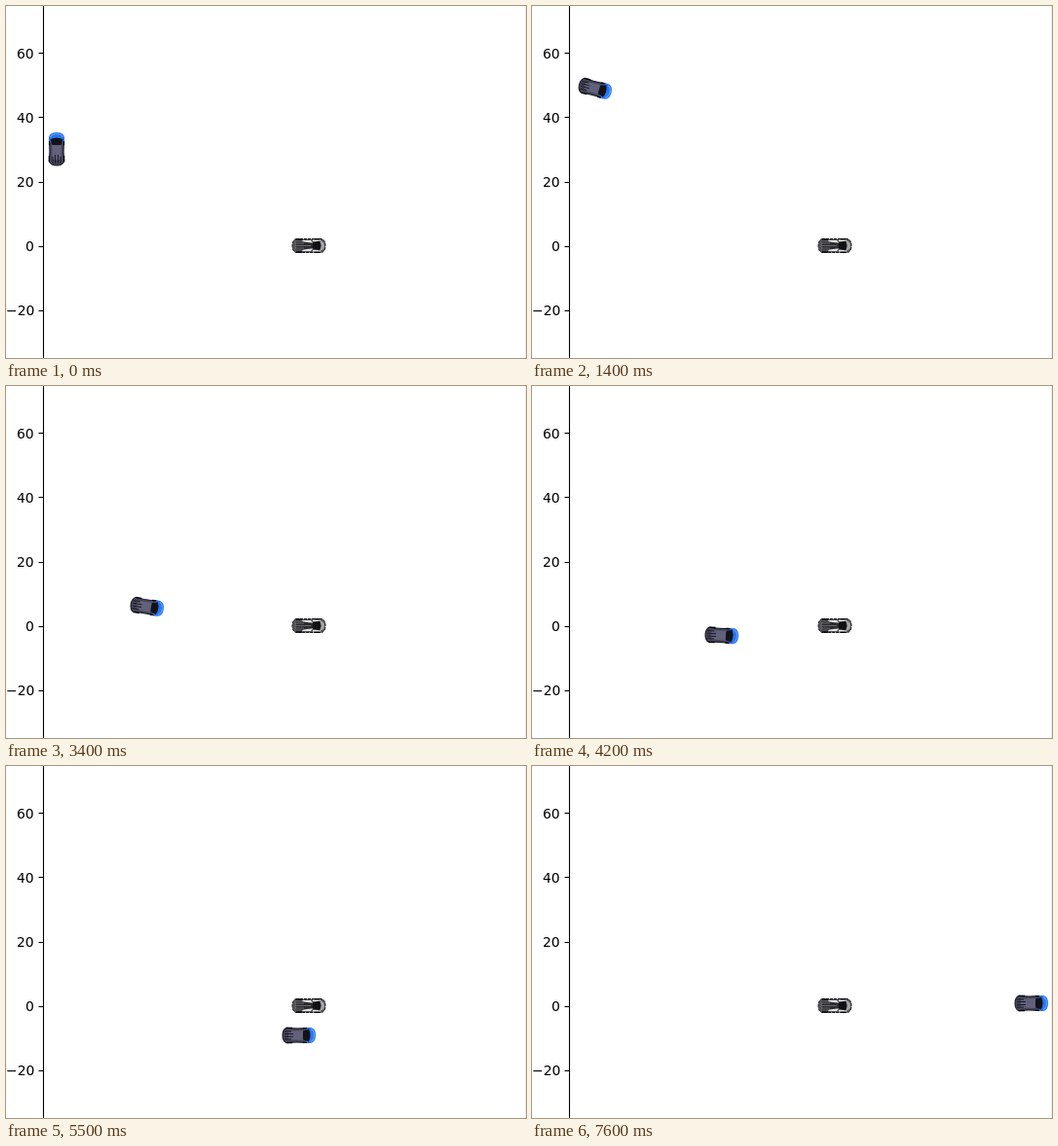
An HTML page that plays this animation: 534 by 362 pixels, repeating every 7.7 s.

```html
<!DOCTYPE html>
<html lang="en">
<head>
<meta charset="utf-8">
<title>Car trajectory</title>
<style>
  html, body { margin: 0; width: 100%; height: 100%; overflow: hidden; background: #fff; }
  svg { display: block; width: 534px; height: 362px; }
  text { font: 13.9px "DejaVu Sans", sans-serif; }
</style>
</head>
<body>
<svg viewBox="0 0 534 362">
  <rect width="534" height="362" fill="#fff"/>
  <path d="M533.5 0V362" stroke="#eee"/>
  <path d="M38.5 0V362" stroke="#000" stroke-width="1.1"/>
  <g id="ticks" stroke-width="1.1"></g>

  <g transform="translate(311 246.5)">
    <path d="M-13-7H13Q17-6 17 0T13 7H-13Q-17 6-17 0T-13-7Z" fill="#55555a" stroke="#161618" stroke-dasharray="3 1"/>
    <path d="M-7-5.5H2L4-3H-5ZM-7 5.5H2L4 3H-5ZM4-6H12V-4.5H4ZM4 6H12V4.5H4Z" fill="#e4e4e4"/>
    <path d="M11-5.5Q16-4.5 16 0T11 5.5L13 0Z" fill="#a5a5a8"/>
    <path d="M-13-4H-5L4-2.5V2.5L-5 4H-13Z" fill="#2b2b30"/>
    <path d="M4-3L11-5Q13 0 11 5L4 3Z" fill="#111114"/>
    <path d="M-14-2.5H-5M-14 0H2M-14 2.5H-5" stroke="#77777c" stroke-width=".8"/>
    <path d="M-13-6.5H-7M-13 6.5H-7M6-6.8H11M6 6.8H11" stroke="#000" stroke-width="1.3"/>
  </g>

  <g id="car">
    <path d="M-13-8.5H12Q17.5-7 17.5 0T12 8.5H-13Q-17.5 7-17.5 0T-13-8.5Z" fill="#e8e8f6"/>
    <path d="M-13-7.7Q-4-6.5 9-7.5V7.5Q-4 6.5-13 7.7Q-17 6-17 0T-13-7.7Z" fill="#454558" stroke="#14141c"/>
    <path d="M6-8H12Q17-7 17 0T12 8H6L10 0Z" fill="#2876f0"/>
    <path d="M12-6.5Q15.5-5 15.5 0T12 6.5" fill="none" stroke="#5ba0fa" stroke-width="1.2"/>
    <path d="M-11-4.5L5-5V5L-11 4.5Z" fill="#62617c"/>
    <path d="M4-4.5L10-6.5Q13 0 10 6.5L4 4.5Z" fill="#12121a"/>
    <path d="M-15-4H-8M-15-1.4H-6M-15 1.4H-6M-15 4H-8" stroke="#181822"/>
    <path d="M-13-7.6H-7M-13 7.6H-7M4-7.4H8M4 7.4H8" stroke="#000" stroke-width="1.3"/>
  </g>
</svg>
<script>
const STEP = 100, LOOP = 7700;

// Waypoints of the drive: step, x, y
const route = [
  [0, 52, 147], [5, 54.5, 95], [10, 59.5, 78], [14, 65, 85], [26, 103.5, 178],
  [34, 145, 227], [42, 195, 256.5], [55, 301, 277], [66, 407, 259], [76, 513, 244]
];

function slope(i, axis) {
  const a = route[Math.max(i - 1, 0)], b = route[Math.min(i + 1, route.length - 1)];
  return (b[axis] - a[axis]) / (b[0] - a[0]);
}

// Cubic Hermite curve through the waypoints
function position(step, axis) {
  let i = 0;
  while (i < route.length - 2 && step >= route[i + 1][0]) i++;
  const a = route[i], b = route[i + 1], span = b[0] - a[0];
  const u = (step - a[0]) / span, v = 1 - u;
  return a[axis] * (1 + 2 * u) * v * v + b[axis] * u * u * (3 - 2 * u)
    + span * u * v * (slope(i, axis) * v - slope(i + 1, axis) * u);
}

// A steady turn from upright, then a smooth straightening out
function heading(step) {
  return Math.min(-90 + 7.5 * step, 15 / (1 + Math.exp((step - 36) / 5)));
}

const ticks = document.getElementById("ticks");

function addShape(name, attributes) {
  const node = document.createElementNS("http://www.w3.org/2000/svg", name);
  for (const key in attributes) node.setAttribute(key, attributes[key]);
  return ticks.appendChild(node);
}

for (let value = -20; value <= 60; value += 20) {
  const y = 246.7 - value * 3.307;
  addShape("path", { d: `M33.5 ${Math.round(y) + 0.5}H38.5`, stroke: "#000" });
  const label = addShape("text", { y: Math.round(y + 5.4) });
  label.textContent = String(value).replace("-", "\u2212");
  label.setAttribute("x", Math.ceil(28.6 - label.getComputedTextLength()));
}

const car = document.getElementById("car");

function draw(time) {
  const step = Math.floor((time % LOOP) / STEP);
  car.setAttribute("transform",
    `translate(${position(step, 1)} ${position(step, 2)}) rotate(${heading(step)})`);
}

const start = performance.now();
function tick() {
  draw(performance.now() - start);
  requestAnimationFrame(tick);
}
tick();
</script>
</body>
</html>
```
